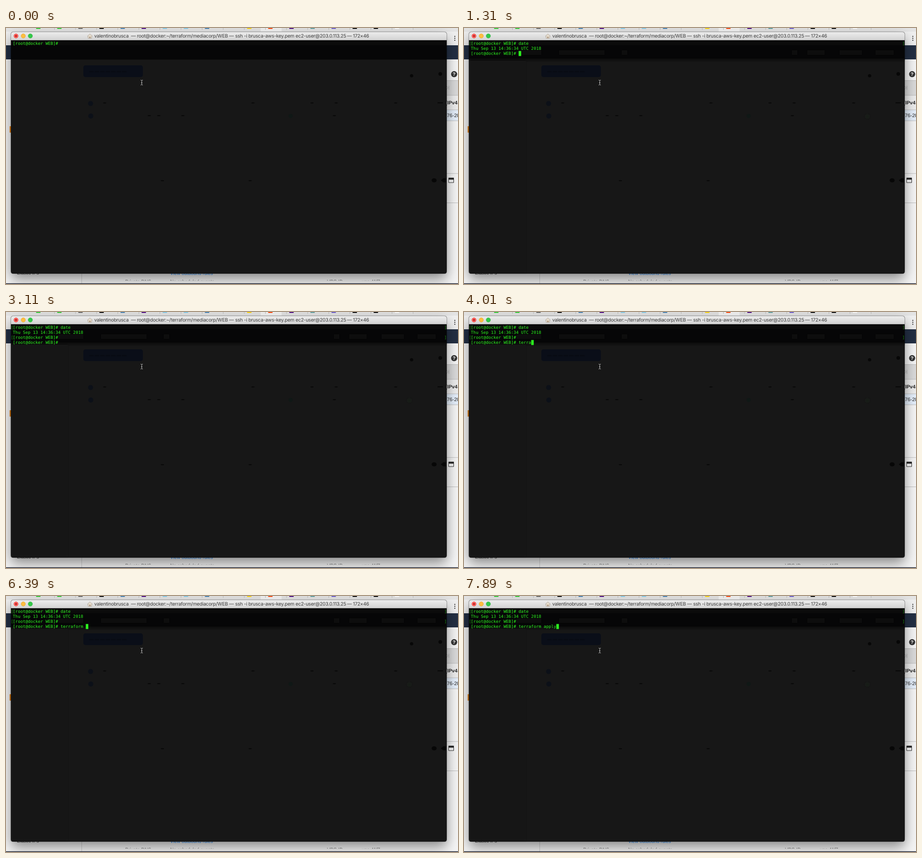
An HTML page for the animation above (8000 ms loop, 994 by 563 pixels).

```html
<!DOCTYPE html>
<html lang="en">
<head>
<meta charset="utf-8">
<title>Terminal session</title>
<style>
  html, body { margin: 0; width: 100%; height: 100%; overflow: hidden; background: #fff; }
  svg { display: block; width: 994px; height: 563px; }
  text { white-space: pre; text-rendering: geometricPrecision; }
  .page { font: 10.4px "Liberation Sans", Arial, sans-serif; fill: #222; }
  .cell { font-size: 11px; }
  .bold { font-weight: bold; }
  .title { font: 10.5px Inter, sans-serif; letter-spacing: -.24px; fill: #3c3c3c; }
  .term { font: 9.186px "DejaVu Sans Mono", monospace; fill: #2cf51f; }
  .mark { opacity: .55; }
</style>
</head>
<body>
<svg viewBox="0 0 994 563">
  <defs>
    <filter id="shadow" x="-10%" y="-10%" width="120%" height="125%"><feGaussianBlur stdDeviation="14"/></filter>
    <filter id="soft" x="-10%" y="-10%" width="120%" height="120%"><feGaussianBlur stdDeviation="1.6"/></filter>
    <linearGradient id="bar" x2="0" y2="1">
      <stop stop-color="#ececec"/><stop offset="1" stop-color="#d2d2d2"/>
    </linearGradient>
    <clipPath id="cut"><path d="M0 541H994V555.500H0z"/></clipPath>
  </defs>

  <!-- browser behind the terminal -->
  <rect width="994" height="563" fill="#f4f4f4"/>
  <rect width="994" height="38" fill="#efefef"/>
  <rect width="994" height="8" fill="#e4e4e4"/>
  <path d="M560 0h46v8h-46z" fill="#f4f4f4"/>
  <g id="tabs"></g>
  <rect y="38" width="994" height="31" fill="#232f43"/>
  <path d="M987 18.500v9" stroke="#444" stroke-width="2.600" stroke-linecap="round" stroke-dasharray="0 4.250"/>
  <path d="M960 116h34v32h-34z" fill="#d9d9d9"/>
  <path d="M960 148h34v32h-34z" fill="#ececec"/>
  <path d="M960 180h34v24h-34z" fill="#e4eefa"/>
  <path d="M960 115.500h34M960 148h34M960 180h34M960 204h34M960 320h34M960 384.500h34" stroke="#bbb"/>
  <path d="M969 128l3.500 3.500-3.500 3.500M974 127v9" stroke="#aaa" fill="none"/>
  <path d="M166.500 540V562" stroke="#ccc"/>
  <path d="M8 216h5v14H8z" fill="#f08c1e"/>
  <rect x="11" y="20" width="958" height="532" rx="8" opacity=".44" filter="url(#shadow)"/>
  <g class="page">
    <circle cx="985.500" cy="101.500" r="6.800" fill="#333"/>
    <text x="982.300" y="105.200" class="bold" style="fill:#fff">?</text>
    <text x="966.500" y="168" class="cell bold">(IPv4</text>
    <text x="969.500" y="196" class="cell">76-20</text>
    <path d="M973.500 330h11v10h-11z" fill="#ddd" stroke="#222"/><path d="M973 329.500h12v4h-12z"/>
    <text x="24" y="542">Elastic IPs</text>
    <text x="361" y="543" style="fill:#1b5fa8">View outbound rules</text>
    <g clip-path="url(#cut)" opacity=".75">
      <text x="262" y="560.500">Private DNS</text>
      <text x="361" y="560.500">No scheduled events</text>
      <text x="706" y="560.500">VPC ID</text>
      <text x="783" y="560.500">vpc-41f7</text>
    </g>
  </g>
  <path d="M0 561.500h994V563H0z" fill="#1c2233"/>

  <!-- terminal window -->
  <path d="M11 14q0-5 5-5H964q5 0 5 5V535q0 5-5 5H16q-5 0-5-5z" fill="#171717" stroke="#000" stroke-opacity=".45" stroke-width="1.500"/>
  <path d="M11 26h958v12H11z" fill="#0b0b0b"/>
  <path d="M11 38h958v31.500H11z" fill="#060607"/>
  <rect x="170" y="82" width="131" height="26" rx="5" fill="#0a0e18"/>
  <path d="M183 96h83" stroke="#080b13" stroke-width="3" stroke-dasharray="10 2"/>
  <g id="blots" fill="#070707">
    <circle cx="186" cy="166" r="5.500" fill="#0c1018"/><circle cx="186.500" cy="193.500" r="5.500" fill="#0c1018"/>
    <circle cx="626" cy="193.500" r="4.500" fill="#101816"/>
    <circle cx="892" cy="105" r="3.600"/><circle cx="955" cy="101" r="4"/>
    <ellipse cx="941.500" cy="335" rx="5.500" ry="4.500"/>
    <path d="M956 335l6-4.500h5v9h-5zM949 163.500h12v2h-12z"/>
  </g>
  <g id="smudges" fill="#141414" filter="url(#soft)">
    <path d="M12 71h124v467H12z" fill="#161616"/>
    <path d="M12 67h956v5H12z" fill="#0b0b0b"/>
    <path d="M115 54h55M209 54h100M347 54h12M721 54h12M755 54h38M826 54h49M905 54h40" stroke="#090909" stroke-width="10"/>
    <circle cx="887" cy="194.500" r="5" fill="#121b12"/>
  </g>
  <path d="M11 27V14q0-5 5-5H964q5 0 5 5V27z" fill="url(#bar)"/>
  <path d="M11 26.500h958" stroke="#a9a9a9" stroke-width=".8"/>
  <g stroke-width=".6">
    <circle cx="22" cy="17.500" r="4.800" fill="#fc5b57" stroke="#df4340"/>
    <circle cx="38" cy="17.500" r="4.800" fill="#fdbe41" stroke="#dfa023"/>
    <circle cx="53.500" cy="17.500" r="4.800" fill="#34c84a" stroke="#25a934"/>
  </g>
  <circle cx="22" cy="17.500" r="1.600" fill="#7d0d0a"/>
  <path d="M179 18l5.500-5 5.500 5h-1.500v4.500h-8V18z" fill="#e5dccd" stroke="#a79c8e" stroke-width=".8"/>
  <path d="M183.300 22.500v-3.500h2.400v3.500z" fill="#a58b72"/>
  <g class="title">
    <text x="194" y="21.300">valentinobrusca</text>
    <text x="275" y="21.300">— root@docker:~/terraform/mediacorp/WEB —</text>
    <text x="504" y="21.300">ssh -i brusca-aws-key.pem ec2-user@203.0.113.25</text>
    <text x="750" y="21.300">— 172×46</text>
  </g>
  <g class="term" id="term"></g>
  <path d="M296 114.500q2.500 0 2.500 2v7q0 2-2.500 2M301 114.500q-2.500 0-2.500 2M298.500 123.500q0 2 2.500 2M297 120.500h3" fill="none" stroke="#b8b8b8"/>
</svg>
<script>
const NS = 'http://www.w3.org/2000/svg';
const $ = id => document.getElementById(id);
function add(parent, tag, attrs, content = '') {
  const el = document.createElementNS(NS, tag);
  for (const k in attrs) el.setAttribute(k, attrs[k]);
  el.textContent = content;
  parent.append(el);
  return el;
}

// Tab icons peeking out at the top edge
const tabs = 'limegreen limegreen dimgray black steelblue indigo skyblue skyblue steelblue none ' +
  'gold orangered indigo cadetblue slateblue black black white';
tabs.split(' ').forEach((fill, i) => {
  const x = 66 + i * 46.4;
  add($('tabs'), 'rect', { x, y: 0, width: 10, height: 2, rx: 1, fill });
  add($('tabs'), 'rect', { x: x + 40, y: 0, width: 1, height: 4, fill: '#bbb' });
});

// Page remnants showing through, by row
const remnants = { 165: [217, 543, 673, 726, 857], 193: [315, 336, 389, 722], 336: [344, 537] };
for (const y in remnants)
  for (const x of remnants[y])
    add($('blots'), 'ellipse', { cx: x, cy: y - .3, rx: 3.5, ry: 1 });

// Sidebar entries: even rows whose length swells and shrinks
for (let i = 0; i < 20; i++)
  add($('smudges'), 'rect', { x: 20, y: 83 + i * 22.4, width: 72 - 28 * Math.cos((i - 2.8) * .7), height: 14, rx: 4 });

const CELL = 5.53, LINE = 11, LEFT = 15.1, BASE = 37.2, LOOP = 8000;
const PROMPT = '[root@docker WEB]# ';
const SHOWN = 150, OUTPUT = 1310, BLANK = 2060, READY = 2210;

// Keystrokes: time, characters
const dateKeys = [...'date'].map((c, i) => [350 + i * 172, c]);
const applyKeys = [
  [3410, 'te'], [3710, 'rr'], [4010, 'a'], [5950, 'fo'], [6100, 'r'], [6250, 'm'],
  [6390, ' '], [6840, 'a'], [7290, 'pp'], [7440, 'l'], [7890, 'y']
];
// Spans in which the cursor is dark
const dark = [[0, SHOWN], [BLANK, READY], [3110, 3410], [5060, 5500]];

const typed = (keys, t) => keys.filter(k => k[0] <= t).map(k => k[1]).join('');

// Lines on screen at time t
function screen(t) {
  const rows = [PROMPT + typed(dateKeys, t)];
  if (t >= OUTPUT) rows.push('Thu Sep 13 14:36:34 UTC 2018', PROMPT);
  if (t >= READY) rows.push(PROMPT + typed(applyKeys, t));
  return rows;
}

const rowY = r => BASE + r * LINE;
const lines = [0, 1, 2, 3].map(r => add($('term'), 'text', { x: LEFT, y: rowY(r) }));

// Margin brackets around an entered prompt
function margin(row, from) {
  const el = add($('term'), 'g', { class: 'mark' });
  add(el, 'text', { x: 10.7, y: rowY(row) }, '[');
  add(el, 'text', { x: 963.8, y: rowY(row) }, ']');
  return { el, from };
}
const timed = [margin(0, OUTPUT), margin(2, BLANK), { el: $('smudges'), from: SHOWN }];
const cursor = add($('term'), 'rect', { width: CELL, height: LINE });

const show = (el, on) => el.setAttribute('visibility', on ? 'visible' : 'hidden');

function draw(t) {
  const rows = screen(t), last = rows.length - 1;
  lines.forEach((el, r) => { el.textContent = rows[r] || ''; });
  timed.forEach(({ el, from }) => show(el, t >= from));
  show(cursor, !dark.some(([from, to]) => t >= from && t < to));
  cursor.setAttribute('x', LEFT + rows[last].length * CELL);
  cursor.setAttribute('y', 28.6 + last * LINE);
}

const start = performance.now();
function tick() {
  draw((performance.now() - start) % LOOP);
  requestAnimationFrame(tick);
}
draw(0);
requestAnimationFrame(tick);
</script>
</body>
</html>
```
